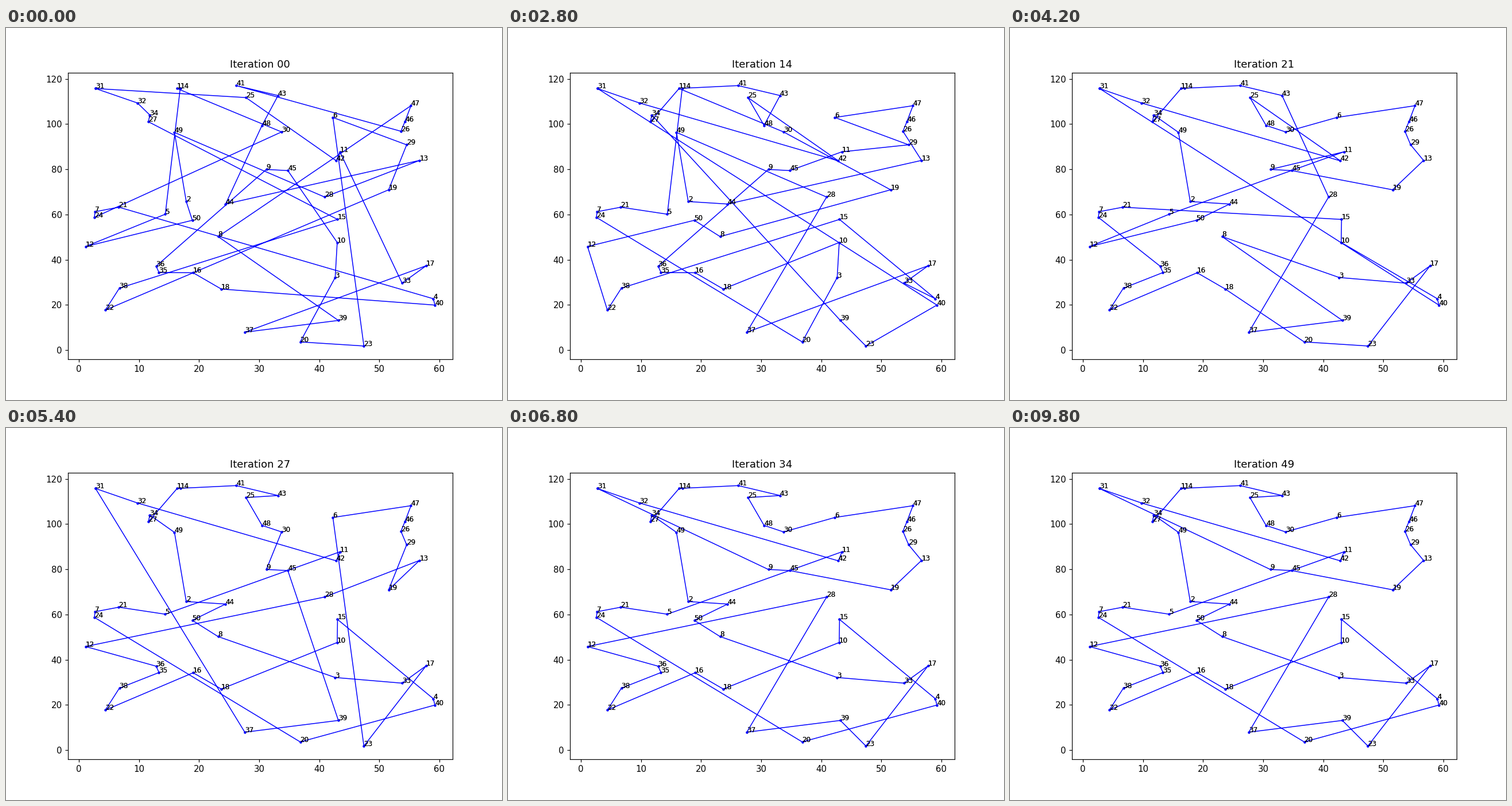
Write a matplotlib script that moves like this. It is 864 px wide and 648 px high and loops after 10000 ms.

```python
import math
import random

import matplotlib.pyplot as plt
from matplotlib.animation import FuncAnimation

FRAMES = 50
INTERVAL = 200
STAGES = 5   # improvements found before the search settles
HOLD = 7     # iterations between improvements

# City positions, listed along the first tour
cities = {
    31: (2.75, 115.7), 32: (9.73, 109.3), 34: (11.78, 104.0),
    27: (11.55, 101.0), 15: (43.04, 57.8), 38: (6.72, 27.4),
    22: (4.38, 17.7), 19: (51.55, 70.9), 29: (54.55, 90.8),
    6: (42.27, 102.9), 23: (47.43, 1.8), 20: (36.83, 3.6),
    3: (42.65, 32.1), 10: (42.99, 47.6), 45: (34.77, 79.4),
    9: (31.19, 79.9), 36: (12.84, 37.1), 35: (13.31, 34.3),
    16: (19.0, 34.2), 18: (23.68, 27.0), 40: (59.25, 19.9),
    4: (59.0, 22.7), 21: (6.62, 63.2), 7: (2.66, 61.2),
    24: (2.56, 58.7), 30: (33.72, 96.5), 1: (16.32, 115.7),
    14: (16.85, 115.8), 5: (14.36, 60.1), 12: (1.08, 45.8),
    50: (18.86, 57.4), 2: (17.85, 65.7), 49: (15.89, 96.3),
    28: (40.89, 67.7), 13: (56.7, 83.9), 44: (24.4, 64.6),
    48: (30.47, 99.4), 43: (33.14, 112.6), 41: (26.17, 117.0),
    26: (53.6, 96.8), 46: (54.27, 101.1), 47: (55.27, 108.1),
    8: (23.16, 50.2), 39: (43.18, 13.1), 37: (27.6, 7.9),
    17: (57.8, 37.3), 33: (53.79, 29.6), 11: (43.44, 87.7),
    42: (42.85, 83.7), 25: (27.79, 111.7)}

first = list(cities)
best = [31, 32, 42, 11, 5, 21, 7, 24, 20, 40, 4, 15, 10, 18, 16, 22, 38,
        35, 36, 12, 28, 37, 39, 23, 17, 33, 3, 8, 50, 44, 2, 49, 34, 27, 1,
        14, 41, 43, 25, 48, 30, 6, 47, 46, 26, 29, 13, 19, 45, 9]


def neighbours(tour):
    """Map each city to the ones after and before it."""
    return {c: (tour[(i + 1) % len(tour)], tour[i - 1])
            for i, c in enumerate(tour)}


def walk(trust):
    """Follow the best tour with chance `trust`, otherwise the first one;
    where the trail is used up, go to the nearest city left."""
    rng = random.Random(7)
    old, new = neighbours(first), neighbours(best)
    here, *left = first
    route = [here]
    while left:
        trail = new if rng.random() < trust else old
        fresh = [c for c in trail[here] if c in left]
        nearest = min(left, key=lambda c: math.dist(cities[here], cities[c]))
        here = fresh[0] if fresh else nearest
        left.remove(here)
        route.append(here)
    return route + route[:1]


tours = [walk(k / STAGES) for k in range(STAGES + 1)]

fig, ax = plt.subplots(figsize=(8, 6), dpi=108)
ax.set_xlim(-1.84, 62.17)
ax.set_ylim(-3.99, 122.73)
path, = ax.plot([], [], "bo-", lw=1, ms=2)
title = ax.set_title("")

# Every city ends two edges, and each edge labels its ends
for name, spot in cities.items():
    for _ in range(2):
        ax.text(*spot, str(name), fontsize=8)


def update(i):
    tour = tours[min((i + 1) // HOLD, STAGES)]
    path.set_data(*zip(*(cities[c] for c in tour)))
    title.set_text(f"Iteration {i:02d}")
    return path, title


anim = FuncAnimation(fig, update, frames=FRAMES, interval=INTERVAL,
                     init_func=lambda: update(0), repeat=True, repeat_delay=0)
plt.show()
```
